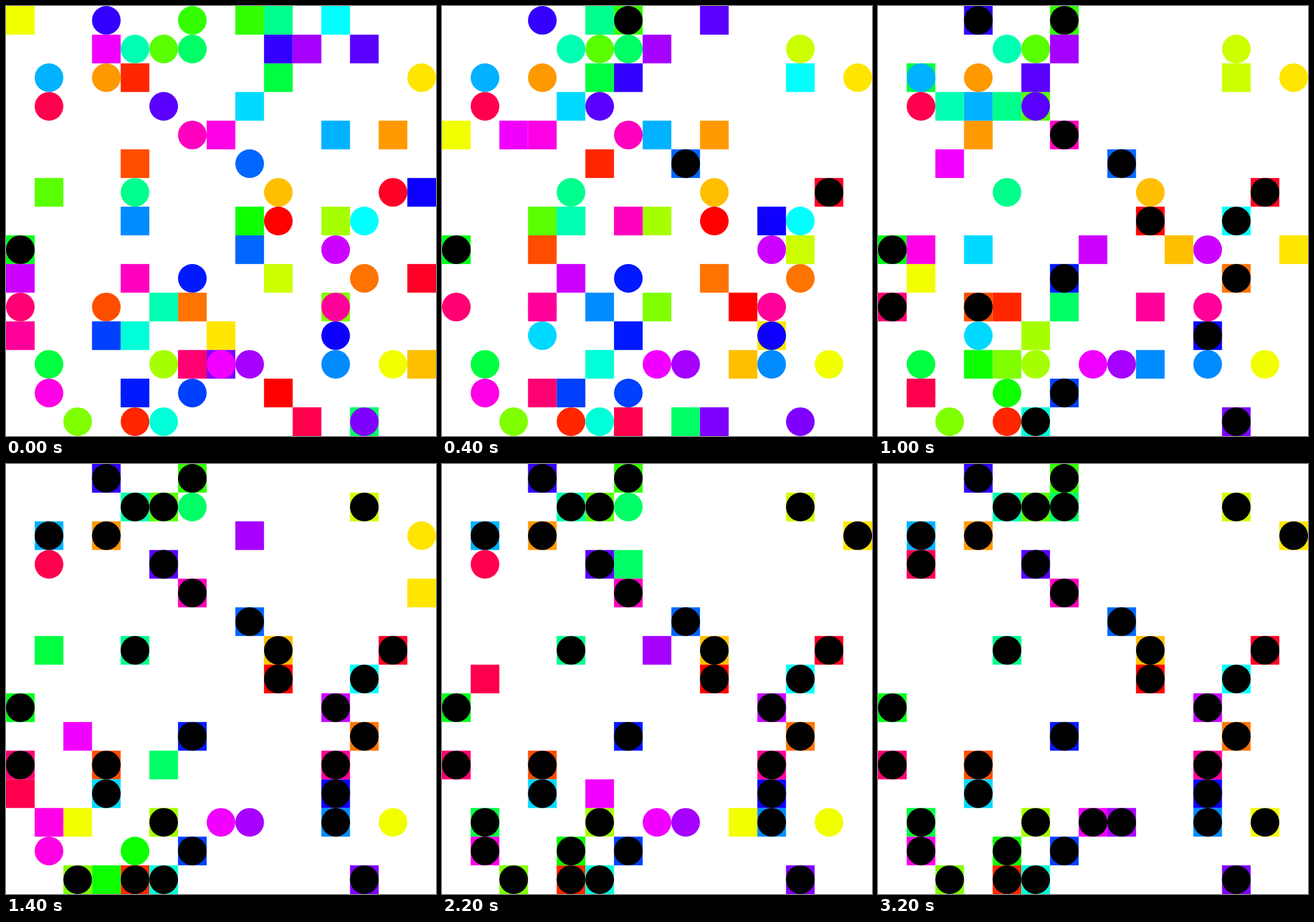
Write an HTML page that moves like this. It is 748 by 748 pixels and loops after 3.3 s.

```html
<!DOCTYPE html>
<html lang="en">
<head>
<meta charset="utf-8">
<title>Squares finding their circles</title>
<style>
  html, body { margin: 0; width: 100%; height: 100%; overflow: hidden; background: #fff; }
  svg { display: block; width: 100%; height: 100%; }
</style>
</head>
<body>
<svg id="stage" viewBox="0 0 748 748"></svg>
<script>
const CELL = 748 / 15, STEPS = 33, STEP_MS = 100;
const walkers = [];

// From start to goal one cell per step, sideways before up or down.
// Corners bend the route; a corner's third value is a pause in steps.
function walk(start, goal, ...corners) {
  let [x, y] = start;
  const track = [[x, y]];
  for (const [toX, toY, pause = 0] of [...corners, goal]) {
    while (x !== toX || y !== toY) {
      if (x !== toX) x += Math.sign(toX - x);
      else y += Math.sign(toY - y);
      track.push([x, y]);
    }
    for (let i = 0; i < pause; i++) track.push([x, y]);
  }
  walkers.push({ goal, track });
}

// In order of hue, from red around the wheel.
walk([9, 13], [9, 7], [10, 9, 1]);
walk([4, 2], [4, 14], [5, 7]);
walk([4, 5], [3, 10]);
walk([6, 10], [12, 9], [9, 8, 1]);
walk([13, 4], [3, 2]);
walk([14, 12], [9, 6], [9, 11], [10, 8]);
walk([7, 11], [14, 2]);
walk([0, 0], [13, 12], [0, 7], [1, 12]);
walk([9, 9], [12, 1]);
walk([11, 7], [5, 12], [6, 8]);
walk([11, 10], [2, 14], [6, 11, 1], [4, 12]);
walk([1, 6], [5, 1], [2, 7, 1], [4, 6]);
walk([8, 0], [6, 0]);
walk([8, 7], [4, 13], [4, 9], [3, 14, 2]);
walk([0, 8], [0, 8], [1, 9]);
walk([9, 2], [1, 12], [4, 1]);
walk([12, 14], [6, 1], [7, 13], [6, 10], [5, 10, 3]);
walk([9, 0], [4, 6], [5, 2, 2]);
walk([5, 10], [4, 1], [4, 5], [2, 3]);
walk([4, 11], [5, 14], [4, 11, 2]);
walk([11, 0], [12, 7], [11, 2, 1], [12, 4]);
walk([8, 3], [3, 11]);
walk([11, 4], [1, 2], [5, 4, 1], [3, 3]);
walk([4, 7], [11, 12], [5, 12]);
walk([8, 8], [8, 5]);
walk([3, 11], [6, 13], [3, 13, 1], [4, 11]);
walk([4, 13], [6, 9]);
walk([14, 6], [11, 11]);
walk([9, 1], [3, 0], [8, 2]);
walk([12, 1], [5, 3], [11, 0]);
walk([7, 12], [12, 14], [7, 14]);
walk([10, 1], [8, 12], [8, 1, 1], [7, 3, 1], [6, 1, 1], [8, 2, 3], [7, 6, 3]);
walk([0, 9], [11, 8], [5, 8, 2]);
walk([3, 1], [7, 12], [2, 6, 3], [2, 5], [2, 9, 3], [5, 11]);
walk([7, 4], [1, 13]);
walk([4, 9], [6, 4]);
walk([0, 11], [11, 10], [1, 10]);
walk([6, 12], [0, 10], [5, 13]);
walk([10, 14], [1, 3], [5, 13], [1, 13, 1], [0, 11, 3]);
walk([14, 9], [13, 6]);

const stage = document.getElementById("stage");

function set(node, attributes) {
  for (const name in attributes) node.setAttribute(name, attributes[name]);
}

function add(tag, attributes) {
  const node = document.createElementNS("http://www.w3.org/2000/svg", tag);
  set(node, attributes);
  return stage.appendChild(node);
}

// Each circle lies above its own square and below the next one.
walkers.forEach((walker, i) => {
  const [x, y] = walker.goal;
  walker.color = `hsl(${i * 360 / walkers.length}, 100%, 50%)`;
  walker.square = add("rect", { width: CELL, height: CELL, fill: walker.color });
  walker.circle = add("circle", { cx: (x + 0.5) * CELL, cy: (y + 0.5) * CELL, r: CELL / 2 });
});

function draw(step) {
  for (const { goal, track, color, square, circle } of walkers) {
    const [x, y] = track[Math.min(step, track.length - 1)];
    const home = x === goal[0] && y === goal[1];
    set(square, { x: x * CELL, y: y * CELL });
    set(circle, { fill: home ? "#000" : color });
  }
}

const start = performance.now();

function tick() {
  const elapsed = Math.max(0, performance.now() - start);
  draw(Math.floor(elapsed / STEP_MS) % STEPS);
  requestAnimationFrame(tick);
}

tick();
</script>
</body>
</html>
```
